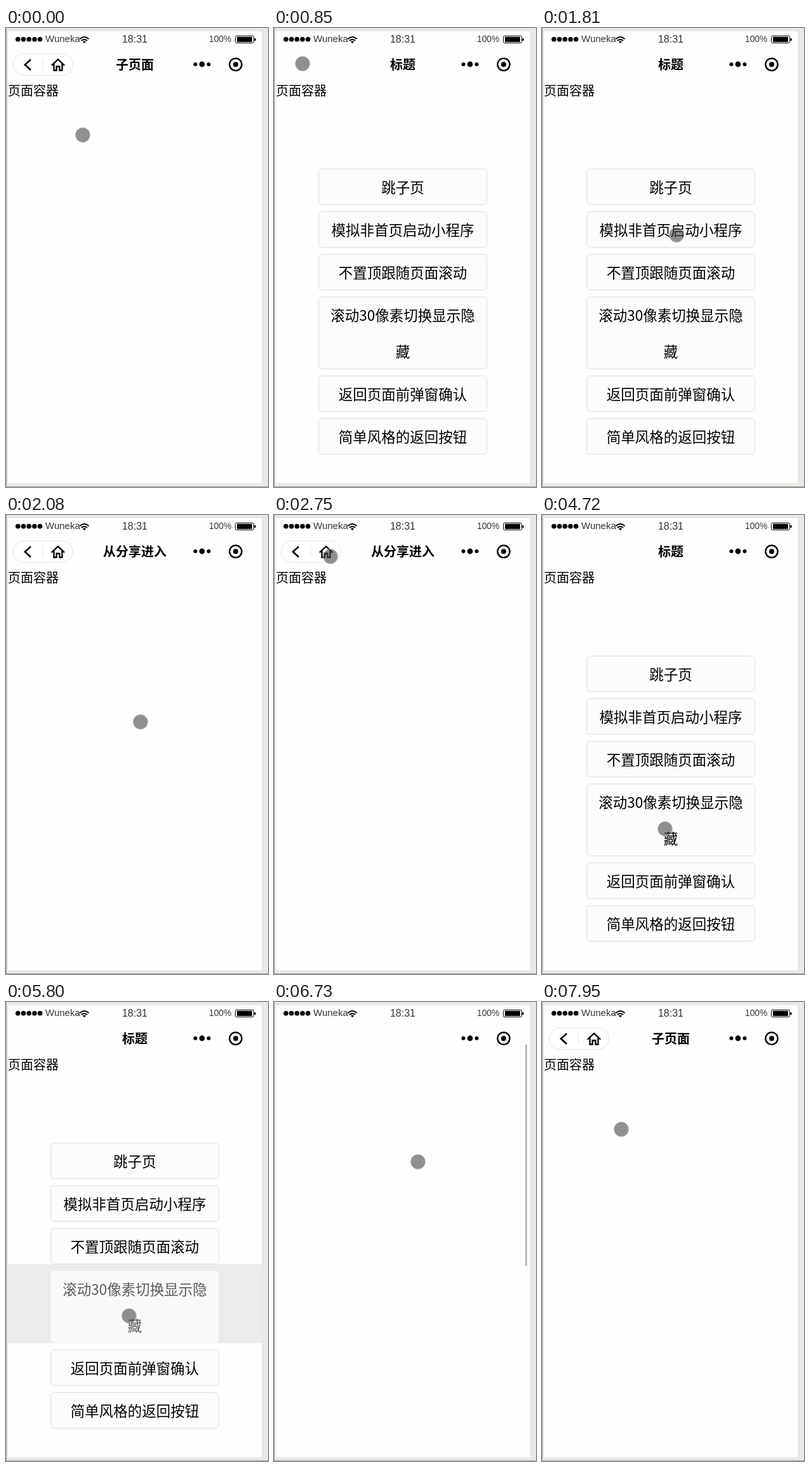
An HTML page that plays this animation: 413x721 px, repeating every 8000 ms.

```html
<!DOCTYPE html>
<html lang="zh-CN">
<head>
<meta charset="utf-8">
<title>导航栏演示</title>
<style>
  html, body { margin: 0; width: 100%; height: 100%; overflow: hidden; background: #e9e8e4; }
  svg { display: block; width: 413px; height: 721px; }
  text { font-family: "Noto Sans CJK SC", "Noto Sans CJK", "Noto Sans", sans-serif; fill: #000; }
  .status text { font-family: "Liberation Sans", sans-serif; fill: #333; }
  .mid { text-anchor: middle; }
  .title { font-size: 20px; font-weight: 700; }
  .line { fill: none; stroke: #000; }
  .band { fill: none; }
  .face { fill: #fcfcfc; stroke: #dedede; }
  .button text { font-size: 22.5px; }
  .pressed .band { fill: #ebebeb; }
  .pressed .face { fill: #f9f9f9; stroke: #f0f0f0; }
  .pressed text { fill: #5c5c5c; }
</style>
</head>
<body>
<svg viewBox="0 0 413 721">
  <defs>
    <clipPath id="view"><rect x="3" y="40" width="400" height="675"/></clipPath>
  </defs>
  <path d="M.5 0V720.5H413" fill="none" stroke="#9b9b99"/>
  <rect x="3" y="5" width="400" height="710" fill="#fefefe"/>

  <g clip-path="url(#view)">
    <text id="content" x="3" y="106" font-size="20">页面容器</text>
    <g id="list"></g>
  </g>

  <g class="status">
    <g id="signal"></g>
    <text x="62" y="22" font-size="15">Wuneka</text>
    <g class="line" stroke-width="2">
      <path d="M116.5 17.2Q123.5 10.8 130.5 17.2M119 20Q123.5 16 128 20"/>
    </g>
    <path d="M121 21.6Q123.5 19.6 126 21.6L123.5 24.2Z"/>
    <text class="mid" x="203" y="23" font-size="16">18:31</text>
    <text x="320" y="22" font-size="13.8">100%</text>
    <rect class="line" x="361.5" y="12.5" width="29" height="11" rx="2"/>
    <rect x="364" y="14" width="24" height="8" rx="1"/>
    <path d="M391.5 16Q394 16 394 18T391.5 20.5Z"/>
  </g>

  <g id="capsule">
    <rect x="11.5" y="40.5" width="94" height="34" rx="17" fill="#fff" stroke="#e4e4e4"/>
    <path d="M57.5 49V66" stroke="#e4e4e4"/>
    <g class="line" stroke-width="2.6">
      <path d="M39 49.5L29.8 57.7L39 66"/>
      <path d="M71.8 58.8L82 49.3L92.2 58.8M75.5 56V66.5H79.6V60.5H84.4V66.5H88.5V56" stroke-width="2.3"/>
    </g>
  </g>
  <text id="title" class="mid title" x="203" y="65.3"></text>

  <circle cx="298.5" cy="57" r="3"/>
  <circle cx="309" cy="57" r="4.4"/>
  <circle cx="319.5" cy="57" r="3"/>
  <circle class="line" cx="362" cy="57.3" r="9.6" stroke-width="2.4"/>
  <circle cx="362" cy="57.3" r="4"/>

  <rect id="bar" x="396" y="5" width="3" height="348" fill="#b9bcbe"/>
  <circle id="cursor" r="11.5" fill="rgba(70,70,70,.6)" stroke="rgba(190,190,190,.7)"/>
</svg>
<script>
const LOOP = 8000;
const $ = id => document.getElementById(id);

// The screen only refreshes during these bursts: start, end, refresh count.
const bursts = [
  [150, 420, 3], [700, 1660, 8], [1810, 2750, 8], [2870, 3810, 8],
  [4120, 4720, 5], [5530, 6460, 8], [6590, 7550, 8], [7670, 7950, 3]
];
// Cursor moves: start, end, x, y.
const moves = [
  [20, 420, 45, 56], [1000, 1810, 212, 325], [2100, 2750, 89, 65],
  [3050, 3810, 211, 433], [4000, 4720, 194, 493], [6000, 6460, 227, 377],
  [6460, 6720, 227, 251], [7000, 7550, 227, 484], [7560, 7950, 125, 200]
];
const scenes = [[0, '子页面'], [835, '标题'], [2070, '从分享进入'], [3000, '标题'], [5920, '子页面']];
const presses = [[1940, 2070, 1], [5660, 5920, 3]];
const labels = [
  ['跳子页'], ['模拟非首页启动小程序'], ['不置顶跟随页面滚动'],
  ['滚动30像素切换显示隐', '藏'], ['返回页面前弹窗确认'], ['简单风格的返回按钮']
];
const DRAG_Y = 377, BAR_LENGTH = 348, VIEW_HEIGHT = 710;

function buildButtons() {
  let top = 221, html = '';
  for (const lines of labels) {
    const height = 57 * lines.length;
    const text = lines.map((line, i) =>
      `<text class="mid" x="203" y="${top + 37.5 + i * 57}">${line}</text>`).join('');
    html += `<g class="button"><rect class="band" x="3" y="${top - 10}" width="400" height="${height + 10}"/>
      <rect class="face" x="70.5" y="${top + .5}" width="265" height="${height - 1}" rx="5"/>${text}</g>`;
    top += height + 10;
  }
  $('list').innerHTML = html;
}

function snap(t) {
  let shown = 0;
  for (const [start, end, count] of bursts) {
    if (t < start) break;
    const gap = (end - start) / (count - 1);
    shown = start + Math.min(count - 1, Math.floor((t - start) / gap + .03)) * gap;
  }
  return shown;
}

function cursorAt(t) {
  let x = 121, y = 168;
  for (const [start, end, toX, toY] of moves) {
    if (t <= start) break;
    const p = Math.min(1, (t - start) / (end - start));
    const eased = p * p * (3 - 2 * p);
    x += (toX - x) * eased;
    y += (toY - y) * eased;
  }
  return [x, y];
}

const show = (node, on) => node.setAttribute('visibility', on ? 'visible' : 'hidden');

function render(now) {
  const t = snap(now % LOOP);
  const [x, y] = cursorAt(t);
  const title = scenes.filter(([start]) => t >= start).pop()[1];
  const isList = title === '标题';
  const scrolling = t > 6580 && t < 7660;
  const navHidden = scrolling && t > 6700;
  const scroll = scrolling ? Math.max(0, DRAG_Y - y) : 0;

  $('title').textContent = title;
  show($('title'), !navHidden);
  show($('capsule'), !isList && !navHidden);
  show($('list'), isList);
  show($('bar'), scrolling);
  $('content').setAttribute('transform', `translate(0 ${-scroll})`);
  $('bar').setAttribute('y', 5 + scroll * BAR_LENGTH / VIEW_HEIGHT);
  $('cursor').setAttribute('transform', `translate(${x} ${y})`);

  const press = presses.find(([start, end]) => t >= start && t < end);
  [...$('list').children].forEach((button, i) =>
    button.classList.toggle('pressed', !!press && press[2] === i));
}

$('signal').innerHTML = [0, 1, 2, 3, 4].map(i =>
  `<circle cx="${18.8 + i * 8.7}" cy="17.7" r="3.8"/>`).join('');
buildButtons();

const origin = performance.now();
function tick() {
  render(performance.now() - origin);
  requestAnimationFrame(tick);
}
tick();
</script>
</body>
</html>
```
